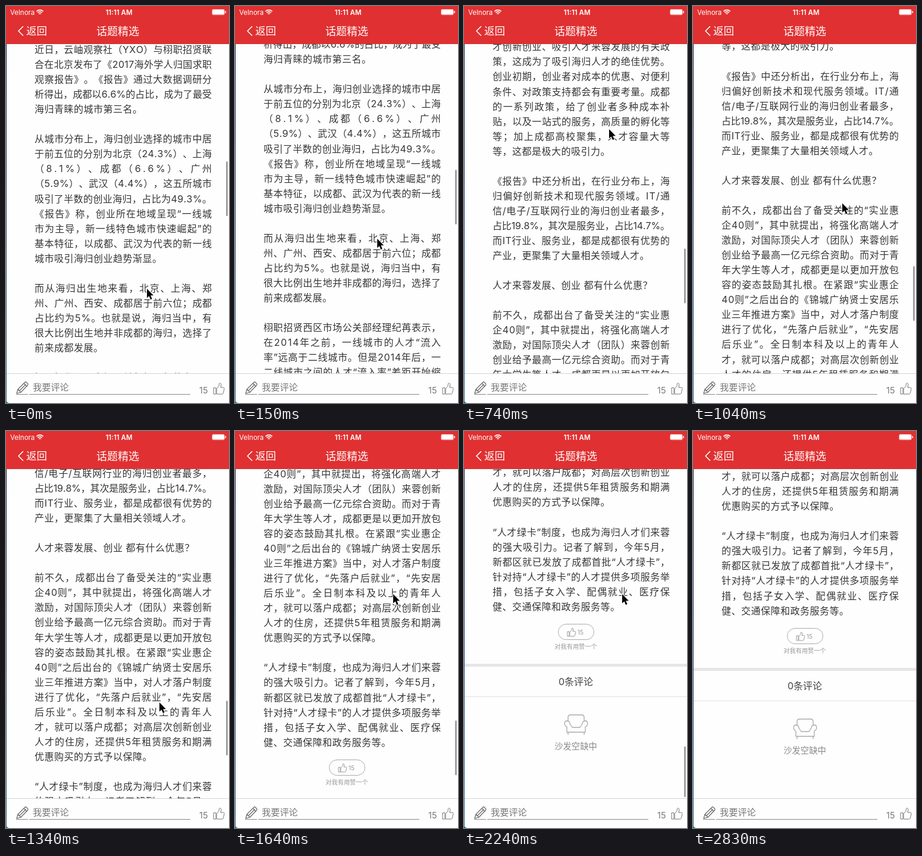
Animation, 375 px wide and 667 px high, one loop 3.72 s. Source, as an HTML page with a canvas:

```html
<!DOCTYPE html>
<html lang="zh-CN">
<head>
<meta charset="utf-8">
<style>
  html, body { margin: 0; width: 375px; height: 667px; overflow: hidden; background: #fff; }
  canvas { display: block; width: 375px; height: 667px; }
</style>
</head>
<body>
<canvas id="stage"></canvas>
<script>
const canvas = document.getElementById('stage');
const dpr = window.devicePixelRatio || 1;
canvas.width = 375 * dpr;
canvas.height = 667 * dpr;
const ctx = canvas.getContext('2d');
ctx.scale(dpr, dpr);

const FAMILY = 'Inter, "Noto Sans CJK SC", "Noto Sans CJK", sans-serif';
const LOOP = 3720;
const TOP = 64, BOTTOM = 617;
const LEFT = 48, COLUMN = 298, PITCH = 25.05, FIRST_LINE = 73;

const ARTICLE = `近日，云岫观察社（YXO）与栩职招贤联
合在北京发布了《2017海外学人归国求职
观察报告》。《报告》通过大数据调研分
析得出，成都以6.6%的占比，成为了最受
海归青睐的城市第三名。

从城市分布上，海归创业选择的城市中居
于前五位的分别为北京（24.3%）、上海
（8.1%）、成都（6.6%）、广州
（5.9%）、武汉（4.4%），这五所城市
吸引了半数的创业海归，占比为49.3%。
《报告》称，创业所在地域呈现“一线城
市为主导，新一线特色城市快速崛起”的
基本特征，以成都、武汉为代表的新一线
城市吸引海归创业趋势渐显。

而从海归出生地来看，北京、上海、郑
州、广州、西安、成都居于前六位；成都
占比约为5%。也就是说，海归当中，有
很大比例出生地并非成都的海归，选择了
前来成都发展。

栩职招贤西区市场公关部经理纪苒表示，
在2014年之前，一线城市的人才“流入
率”远高于二线城市。但是2014年后，一
二线城市之间的人才“流入率”差距开始缩
小。尤其是像成都这种“新一线城市”，其
对人才的吸引力急剧上升。而目前，从该
机构的数据来看，成都的人才“流入率”已
经远高于“流出率”。

纪苒表示，城市的经济发展、宜居环境、
人才发展的机会空间等，都是海归们看重
的条件。成都除了在这些方面有着硬实
力，更是在近些年来出台了一系列扶持人
才创新创业、吸引人才来蓉发展的有关政
策，这成为了吸引海归人才的绝佳优势。
创业初期，创业者对成本的优惠、对便利
条件、对政策支持都会有重要考量。成都
的一系列政策，给了创业者多种成本补
贴，以及一站式的服务，高质量的孵化等
等；加上成都高校聚集，人才容量大等
等，这都是极大的吸引力。

《报告》中还分析出，在行业分布上，海
归偏好创新技术和现代服务领域。IT/通
信/电子/互联网行业的海归创业者最多，
占比19.8%，其次是服务业，占比14.7%。
而IT行业、服务业，都是成都很有优势的
产业，更聚集了大量相关领域人才。

人才来蓉发展、创业 都有什么优惠？

前不久，成都出台了备受关注的“实业惠
企40则”，其中就提出，将强化高端人才
激励，对国际顶尖人才（团队）来蓉创新
创业给予最高一亿元综合资助。而对于青
年大学生等人才，成都更是以更加开放包
容的姿态鼓励其扎根。在紧跟“实业惠企
40则”之后出台的《锦城广纳贤士安居乐
业三年推进方案》当中，对人才落户制度
进行了优化，“先落户后就业”，“先安居
后乐业”。全日制本科及以上的青年人
才，就可以落户成都；对高层次创新创业
人才的住房，还提供5年租赁服务和期满
优惠购买的方式予以保障。

“人才绿卡”制度，也成为海归人才们来蓉
的强大吸引力。记者了解到，今年5月，
新都区就已发放了成都首批“人才绿卡”，
针对持“人才绿卡”的人才提供多项服务举
措，包括子女入学、配偶就业、医疗保
健、交通保障和政务服务等。`.split('\n');

function setFont(size, weight = 400) {
  ctx.font = `${weight} ${size}px ${FAMILY}`;
}

// y is the middle of the glyphs
function label(text, x, y, size, color, align = 'left', weight = 400) {
  setFont(size, weight);
  ctx.textAlign = align;
  ctx.fillStyle = color;
  ctx.fillText(text, x, y + size * 0.37);
}

function stroke(path, color, width = 1) {
  ctx.strokeStyle = color;
  ctx.lineWidth = width;
  ctx.lineJoin = ctx.lineCap = 'round';
  ctx.stroke(path);
}

function rect(x, y, w, h, color) {
  ctx.fillStyle = color;
  ctx.fillRect(x, y, w, h);
}

function pill(x, y, w, h, r) {
  const path = new Path2D();
  path.roundRect(x, y, w, h, r);
  return path;
}

// Full lines are justified between all characters; closing lines keep natural spacing.
setFont(16);
const lines = ARTICLE.map((text, i) => {
  const chars = [...text];
  const widths = chars.map(c => ctx.measureText(c).width);
  const total = widths.reduce((a, b) => a + b, 0);
  const gap = ARTICLE[i + 1] ? (COLUMN - total) / (chars.length - 1) : 0.5;
  let x = LEFT;
  return chars.map((char, n) => {
    const glyph = { char, x };
    x += widths[n] + gap;
    return glyph;
  });
});

const THUMB = new Path2D('M.5 8.5H4V19H.5ZM5.5 9.5L9 5.5 9.5 1.5C10 0 13 .2 12.8 3.5L12 8H16.5C18 8 18.5 9 18 10.5L16.2 17.5C15.9 18.7 15.3 19 14 19H5.5Z');
const PENCIL = new Path2D('M18 651L20 644 32 632Q33 631 34 632L36.5 634.5Q37.5 635.5 36.5 637L25 649ZM20 644L25 649M22.5 646.5L33 636M30 634L35 639');
const SOFA = new Path2D('M175 487V481Q175 477 179 477H198Q202 477 202 481V487M173 506V497C168 495 168 487 173 487C177 487 178 490 178 492L182 498H195L199 492C199 490 200 487 204 487C209 487 209 495 204 497V506ZM175 506V510M202 506V510');
const ARROW = new Path2D('M0 0V15.5L3.6 12.2 6 18 8.6 16.9 6.2 11.3H11Z');
const CHEVRON = new Path2D('M28.5 34.5L21 42 28.5 49.5');

function thumbIcon(x, y, scale, color) {
  ctx.save();
  ctx.translate(x, y);
  ctx.scale(scale, scale);
  stroke(THUMB, color, 1 / scale);
  ctx.restore();
}

// Two flicks: accelerating drag, then glide; the second ends in a bounce.
const GLIDE = 500, END = 1575;
const flick1 = { start: 0, release: 268, length: 268 };
const flick2 = { start: 1340, release: 1626, length: 182 };
const drag = (f, t) => f.length * Math.min(1, Math.max(0, (t - f.start) / (f.release - f.start))) ** 2;
const glide = (speed, t) => speed * GLIDE * (1 - Math.exp(-t / GLIDE));

function scrollAt(t) {
  if (t < flick1.release) return drag(flick1, t);
  const first = flick1.length + glide(2.008, Math.min(t, flick2.start) - flick1.release);
  if (t < flick2.release) return first + drag(flick2, t);
  const base = first + flick2.length;
  const speed = 2 * flick2.length / (flick2.release - flick2.start);
  const hit = -GLIDE * Math.log(1 - (END - base) / (speed * GLIDE));
  const dt = t - flick2.release;
  if (dt < hit) return base + glide(speed, dt);
  const bounce = dt - hit;
  return END + speed * Math.exp(-hit / GLIDE) * bounce * Math.exp(-bounce / 100);
}

function cursorAt(t) {
  if (t < 740) {
    const d = drag(flick1, t);
    return [237 + 7 * d / 268, 475 - d];
  }
  if (t < flick2.start) {
    const p = (t - 740) / 600, e = p * p * (3 - 2 * p);
    return [244 + 14 * e, 207 + 249 * e];
  }
  const d = drag(flick2, t);
  return [258 + 8 * d / 182, 456 - d];
}

// The picture refreshes about every 150 ms and rests at the end.
function stepTime(t) {
  let shown = 0;
  for (let i = 1; i < 20; i++) {
    const at = 150 * i - (i > 1 ? 10 : 0) - (i > 15 ? 10 : 0);
    if (at <= t) shown = at;
  }
  return shown;
}

function drawArticle(scroll) {
  setFont(16);
  ctx.textAlign = 'left';
  ctx.fillStyle = '#363636';
  lines.forEach((line, i) => {
    const y = FIRST_LINE + PITCH * i - scroll;
    if (y < TOP - 14 || y > BOTTOM + 14) return;
    for (const { char, x } of line) ctx.fillText(char, x, y + 6);
  });
}

function drawFooter(scroll) {
  ctx.save();
  ctx.translate(0, Math.round(1582 - scroll));
  stroke(pill(158.5, 324.5, 60, 26, 13), '#aaa');
  thumbIcon(174, 330.5, 0.76, '#999');
  label('15', 191, 338.5, 10, '#999');
  label('对我有用赞一个', 188, 362, 10.2, '#999', 'center');
  rect(1, 391, 374, 5, '#e6e6e6');
  label('0条评论', 188, 421, 16, '#444', 'center');
  rect(1, 446, 374, 1, '#e0e0e0');
  stroke(SOFA, '#aaa', 1.3);
  label('沙发空缺中', 188, 530, 14.3, '#888', 'center');
  ctx.restore();
}

function drawScrollbar(scroll, t) {
  if (t >= 2830) return;
  const over = Math.max(0, scroll - END);
  const top = 261 + 262 * Math.min(scroll, END) / END + over;
  ctx.globalAlpha = t >= 2680 ? 0.6 : 1;
  ctx.fillStyle = '#a0a0a0';
  ctx.fill(pill(370, top, 3, 92 - over, 1.5));
  ctx.globalAlpha = 1;
}

function drawHeader() {
  rect(0, 0, 375, TOP, '#e03031');
  rect(0, TOP - 1, 375, 1, '#c93a38');
  label('Velnora', 7, 10.5, 11.5, '#fff');
  label('11:11 AM', 190, 10.5, 11.5, '#fff', 'center', 600);
  for (const r of [2, 5, 8]) {
    const arc = new Path2D();
    arc.arc(57, 14, r - 0.6, -Math.PI * 0.75, -Math.PI * 0.25);
    stroke(arc, '#fff', 1.6);
  }
  ctx.fillStyle = '#fff';
  ctx.fill(pill(347, 6, 20, 8.5, 1.5));
  stroke(pill(346.5, 5.5, 21, 9.5, 2), '#f6b5b5', 0.6);
  rect(368.5, 8.5, 1.5, 3.5, '#fff');
  stroke(CHEVRON, '#fff', 1.6);
  label('返回', 34, 42, 17.5, '#fff');
  label('话题精选', 188, 42, 18, '#fff', 'center');
}

function drawToolbar() {
  rect(1, BOTTOM, 374, 50, '#fefefe');
  rect(1, BOTTOM, 374, 1, '#d4d4d4');
  stroke(PENCIL, '#666', 1.2);
  rect(17, 652, 20, 1, '#888');
  rect(39, 652, 271, 1, '#888');
  label('我要评论', 45, 640.5, 15.2, '#777');
  label('15', 325, 645.5, 14.5, '#777');
  thumbIcon(349, 633, 1, '#777');
}

function drawDesktopEdge() {
  const edge = ctx.createLinearGradient(0, TOP, 0, 667);
  edge.addColorStop(0, '#17264a');
  edge.addColorStop(0.6, '#24507f');
  edge.addColorStop(1, '#2c6f8c');
  ctx.fillStyle = edge;
  ctx.fillRect(0, TOP, 1, 603);
  ctx.fill(new Path2D('M0 667V662Q1 666 5 667Z'));
}

function drawCursor(t) {
  if (t >= 2680) return;
  ctx.save();
  ctx.translate(...cursorAt(t));
  stroke(ARROW, '#fff', 2);
  ctx.fillStyle = '#000';
  ctx.fill(ARROW);
  ctx.restore();
}

function draw(t) {
  const scroll = scrollAt(t);
  rect(0, 0, 375, 667, '#fefefe');
  drawArticle(scroll);
  drawFooter(scroll);
  drawScrollbar(scroll, t);
  drawHeader();
  drawToolbar();
  drawDesktopEdge();
  drawCursor(t);
}

const begin = performance.now();
function tick() {
  draw(stepTime((performance.now() - begin) % LOOP));
  requestAnimationFrame(tick);
}
tick();
</script>
</body>
</html>
```
